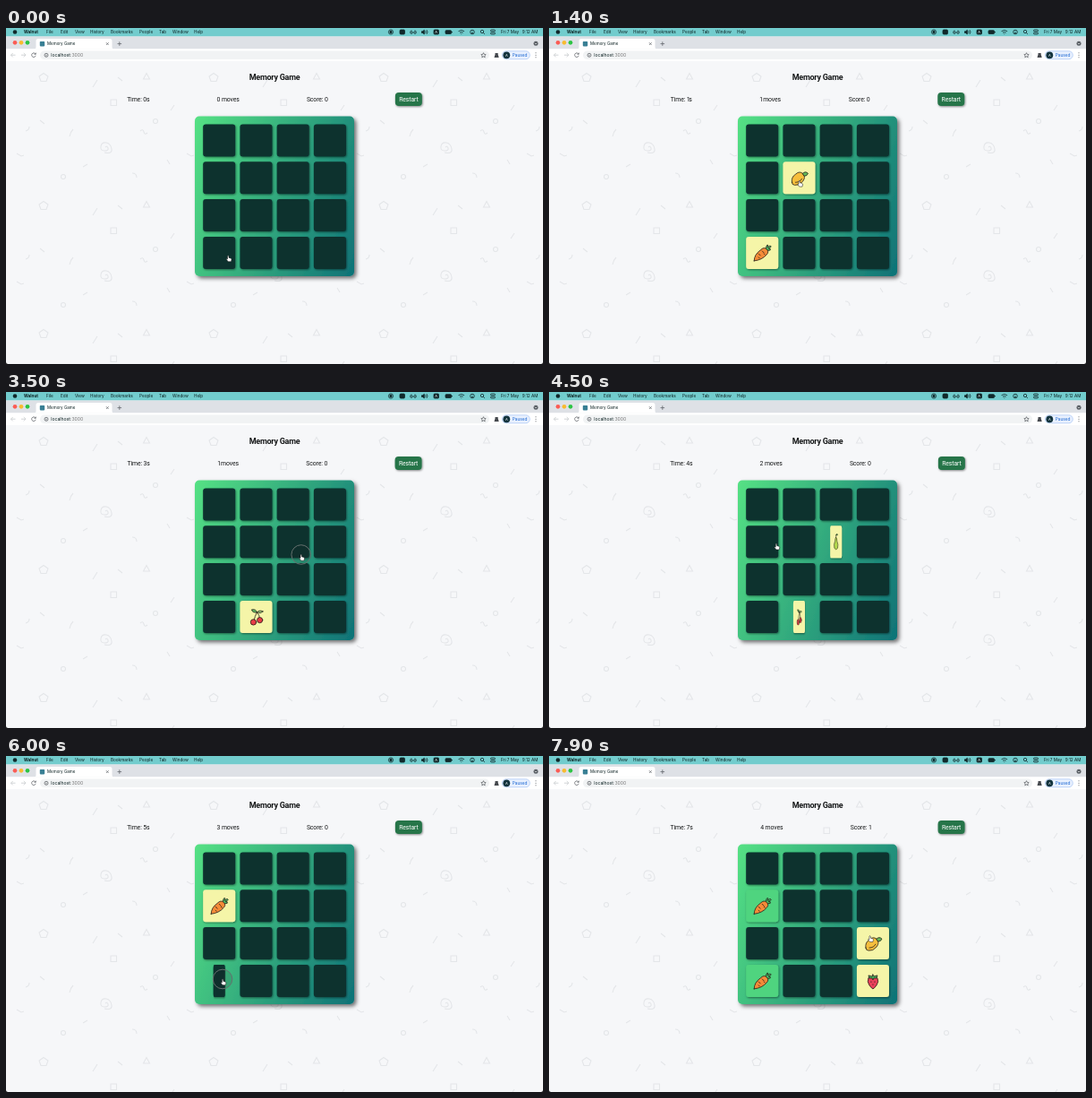
Recreate the animation shown at these times as an HTML page. Size 600 by 375 pixels, loop 8000 ms.

```html
<!DOCTYPE html>
<html lang="en">
<head>
<meta charset="utf-8">
<title>Memory Game</title>
<style>
  html, body { margin: 0; width: 100%; height: 100%; overflow: hidden; background: #f6f7f9; }
  svg { display: block; width: 100vw; height: 100vh; }
  text { font: 4.65px Inter, sans-serif; fill: #0b2021; }
  .page text { font: 6.9px Roboto, sans-serif; letter-spacing: -.12px; fill: #161819; }
  .page .title { font-size: 9px; font-weight: 700; letter-spacing: -.25px; }
  .page .label { fill: #fff; }
  .line { fill: none; stroke: #62666b; stroke-width: .8; }
  .ink { stroke: #25201b; stroke-width: .8; stroke-linejoin: round; stroke-linecap: round; }
</style>
</head>
<body>
<svg viewBox="0 0 600 375">
  <defs>
    <linearGradient id="green" x1="-.1" y1=".28" x2="1.1" y2=".72">
      <stop stop-color="#55e184"/><stop offset="1" stop-color="#0f7277"/>
    </linearGradient>
    <filter id="deep" x="-10%" y="-10%" width="125%" height="125%">
      <feDropShadow dx="2.5" dy="2.5" stdDeviation="2" flood-opacity=".55"/>
    </filter>
    <filter id="soft" x="-20%" y="-20%" width="150%" height="150%">
      <feDropShadow dx=".8" dy="1" stdDeviation=".9" flood-opacity=".45"/>
    </filter>
    <pattern id="doodles" y="37" width="190" height="143" patternUnits="userSpaceOnUse">
      <g fill="none" stroke="#e4e6e9" stroke-width="1.1">
        <path d="M111 96q2-2 3 1t-4 3-4-5 6-4 6 7-8 4"/>
        <path d="M42 13.500l5 3.500-2 5.500h-6l-2-5.500z"/>
        <path d="M117 43h6.500v6.500h-6.500z"/>
        <path d="M157 13.500l3.500 6.500h-7z"/>
        <circle cx="64" cy="129" r="2.500"/>
        <circle cx="167" cy="67" r="2.500"/>
        <path d="M71 84q1-5 4-8M97 29l5-8M184 55l4-6M12 103l5 3 3-1M150 78q3-3 4 1t4 1"/>
        <path d="M125 18l5 4M22 78q4-1 4-5M38 66l5 4M141 125q5 0 5 5M86 118l5-3M180 110l3 5"/>
      </g>
    </pattern>
  </defs>

  <rect width="600" height="9.500" fill="#72cccd"/>
  <circle cx="10" cy="4.500" r="2.300" fill="#10282a"/>
  <g id="menu"></g>
  <g fill="none" stroke="#10282a" stroke-width=".8">
    <circle cx="430" cy="4.500" r="2.600"/><circle cx="430" cy="4.500" r="1.200" fill="#10282a"/>
    <rect x="440" y="2" width="5.500" height="5" rx="1.200" fill="#10282a"/>
    <circle cx="453" cy="5" r="1.300"/><circle cx="457" cy="5" r="1.300"/><path d="M452 3.500l1-1M458 3.500l-1-1"/>
    <path d="M464.500 3.700h1.200l1.600-1.400v4.600l-1.600-1.400h-1.200z" fill="#10282a"/><path d="M468.500 3q1.500 1.500 0 3M470 2.200q2 2.300 0 4.600"/>
    <rect x="478" y="2" width="5.500" height="5" rx="1" fill="#10282a"/>
    <rect x="491" y="2.700" width="6.500" height="3.800" rx=".8" fill="#10282a"/><path d="M498.500 4v1.200"/>
    <path d="M505.500 3.700q3.300-2.600 6.600 0M507 5.200q1.800-1.300 3.600 0M508.500 6.600h.7"/>
    <circle cx="521" cy="4.500" r="2.300"/><path d="M519.800 6q1.200-1.500 2.400 0M521 3.500v.8"/>
    <circle cx="532" cy="4" r="1.700"/><path d="M533.300 5.300l1.600 1.600"/>
    <rect x="541.500" y="2" width="5" height="1.900" rx=".95"/><rect x="541.500" y="5" width="5" height="1.900" rx=".95"/>
  </g>
  <text x="479.300" y="6" style="font-size:4px;fill:#fff">A</text>

  <rect y="9.500" width="600" height="14" fill="#dee1e6"/>
  <circle cx="10" cy="16.300" r="2.350" fill="#fb5c55"/>
  <circle cx="17" cy="16.300" r="2.350" fill="#f8bb30"/>
  <circle cx="24" cy="16.300" r="2.350" fill="#2cc443"/>
  <path d="M31 23.500q2.500 0 2.500-2.500v-6.500q0-2.500 2.500-2.500h80q2.500 0 2.500 2.500v6.500q0 2.500 2.500 2.500z" fill="#fff"/>
  <rect x="37.800" y="15" width="5.400" height="5.400" rx=".8" fill="#397f94"/>
  <text x="46" y="19.300" style="font-size:4.500px">Memory Game</text>
  <path class="line" d="M112 16.300l2.600 2.600m0-2.600l-2.600 2.600M124.500 17.600h4.600m-2.300-2.300v4.600"/>
  <circle cx="592" cy="17.300" r="2.500" fill="#5a5f65"/>
  <path d="M590.800 16.800l1.200 1.200 1.200-1.200" fill="none" stroke="#fff" stroke-width=".6"/>

  <rect y="23.300" width="600" height="13.700" fill="#fff"/>
  <rect x="38" y="25.500" width="502" height="9.600" rx="4.800" fill="#f1f3f4"/>
  <g class="line">
    <path d="M10.500 30.200h-5m2.200-2.200l-2.200 2.200 2.200 2.200M17 30.200h5m-2.200-2.200l2.200 2.200-2.200 2.200" stroke="#c6c9cc"/>
    <path d="M32.800 28.800a2.300 2.300 0 1 0 .4 2M33.300 27.600v1.700h-1.700"/>
    <circle cx="45" cy="30.300" r="2"/><path d="M45 30v1.500M45 28.900v.4"/>
    <path d="M533.500 27.700l.8 1.700 1.900.2-1.400 1.300.4 1.900-1.700-1-1.700 1 .4-1.900-1.400-1.300 1.900-.2z"/>
  </g>
  <path d="M546.500 28h3.200v1.500l1 3.400h-5.200l1-3.400z" fill="#45494e"/>
  <text x="50.200" y="32" style="font-size:5.100px">localhost<tspan fill="#777">:3000</tspan></text>
  <rect x="554.300" y="25.800" width="31" height="9" rx="4.500" fill="#e8f0fe" stroke="#9bbcf1" stroke-width=".6"/>
  <circle cx="559.300" cy="30.300" r="3.900" fill="#12333d"/>
  <text x="557.900" y="31.800" style="font-size:4px;fill:#fff">A</text>
  <text x="565.700" y="32" style="font-size:4.800px;fill:#1a66d2">Paused</text>
  <path d="M592 27.700v.1m0 2.400v.1m0 2.400v.1" stroke="#50555a" stroke-width="1.100" stroke-linecap="round"/>

  <rect y="37" width="600" height="338" fill="#f6f7f9"/>
  <rect y="37" width="600" height="338" fill="url(#doodles)"/>
  <g class="page">
    <text class="title" x="300" y="58" text-anchor="middle">Memory Game</text>
    <text id="time" y="82"></text>
    <text id="moves" y="82"></text>
    <text id="score" y="82"></text>
    <g id="restart">
      <rect y="72" width="30" height="15" rx="4" fill="#267449" filter="url(#soft)"/>
      <text class="label" x="15" y="82" text-anchor="middle">Restart</text>
    </g>
  </g>
  <rect x="211" y="98.500" width="178" height="178.500" rx="5" fill="url(#green)" filter="url(#deep)"/>
  <g id="cards"></g>
  <circle id="ring" r="10.800" fill="#222" fill-opacity=".12" stroke="#66716f" stroke-width="1"/>
  <g id="pointer" stroke="#111" stroke-width=".5" stroke-linejoin="round" fill="#fff">
    <path id="hand" d="M-.6.300q.7-.9 1.200.100l.3 2 2.100.600q1 .300.800 1.500l-.5 2.200h-3.300l-2.100-2.700q.100-1 1.400 0z"/>
    <path id="arrow" d="M0 0v5l1.200-1 .9 1.900 1-.500-.9-1.800h1.500z"/>
  </g>
  <path d="M0 372.500v2.500h2.500q-2.500 0-2.500-2.500M600 372.500v2.500h-2.500q2.500 0 2.500-2.500" fill="#111"/>
</svg>
<script>
const LOOP = 8000, FLIP = 240, SIZE = 36;
const $ = id => document.getElementById(id);
const clamp = v => Math.max(0, Math.min(1, v));
const ease = v => v * v * (3 - 2 * v);

const menu = [[20, "Walnut"], [45, "File"], [61, "Edit"], [77, "View"], [94, "History"],
  [117, "Bookmarks"], [149, "People"], [171, "Tab"], [186, "Window"], [210, "Help"],
  [553, "Fri 7 May\u2002 9:12 AM"]];
$("menu").innerHTML = menu.map(([x, label], i) =>
  `<text x="${x}" y="6.2" ${i ? "" : 'font-weight="700" style="font-weight:700"'}>${label}</text>`).join("");

const shape = (d, fill) => `<path class="ink" d="${d}" fill="${fill}"/>`;
const icons = {
  carrot: shape("M4-5q1-4 2-4 1 1 0 3 3-3 4-1 0 1-3 2 3 0 2 2-2 1-5 0z", "#48b964") +
    shape("M-9 9q0-7 7-12 4-4 7-1t0 6q-5 6-14 7z", "#f58b38") +
    shape("M-4 1l2 2M0-2l2 2M-3 6l-1-1M3 2l-1-1", "none"),
  cherry: shape("M-2.500 5q1-6 3.500-10Q4-2 4 2", "none") +
    shape("M1-5q-5 1-6-3 5-1 6 3z", "#62bd62") + shape("M1-5q2-3 7-1-3 3-7 1z", "#a9dc83") +
    '<circle class="ink" cx="-3" cy="6" r="3.200" fill="#e93d46"/><circle class="ink" cx="4.200" cy="3.700" r="3.100" fill="#e93d46"/>',
  mango: shape("M-8 5q-1-6 4-9 4-4 8-1 4 4 0 9-4 5-9 4-3 0-3-3z", "#f6be3c") +
    shape("M4-5q3-3 6 0-1 3-4 3z", "#62b95a") + shape("M-4 5q5 0 7-4", "none"),
  pear: shape("M0-5q3 0 3 4 5 4 2 8-5 3-10 0-3-4 2-8 0-4 3-4z", "#b3d84d") +
    shape("M0-5v-3q4-2 5 0-2 2-5 0", "#55a94f"),
  strawberry: shape("M-5-3q-2 4 1 8 3 4 4 4t4-4q3-4 1-8-5-3-10 0z", "#e9415a") +
    shape("M0-7l1 2 4-1-1 3-3 0-1 2-1-2-3 0-1-3 4 1z", "#49ae5b") +
    shape("M-2 1v.5M2 1v.5M0 4v.5", "none")
};

// column, row, icon, time opened, time closed
const flips = [
  [0, 3, "carrot", 150, 9e3], [1, 1, "mango", 1100, 1840],
  [1, 3, "cherry", 2450, 4400], [2, 1, "pear", 3520, 4400],
  [0, 1, "carrot", 4900, 9e3], [0, 3, "carrot", 5900, 9e3],
  [3, 3, "strawberry", 7150, 9e3], [3, 2, "mango", 7600, 9e3]
];
flips[0][4] = flips[1][4];
const MATCH = 6150;
const clicks = flips.map(f => f[3]);

// time, x, y
const path = [
  [0, 248.2, 254], [300, 248.2, 254], [800, 277.2, 218], [1050, 279, 166], [1300, 279, 166],
  [2000, 291.500, 244], [2100, 292.2, 245], [2800, 292.2, 245], [3400, 329.700, 181.500],
  [3750, 329.700, 181.500], [4750, 240, 167], [5050, 241, 169], [5400, 282.2, 220],
  [5800, 242, 249], [6200, 242, 249], [6900, 354.800, 230.800], [7080, 362, 249],
  [7250, 362, 249], [7530, 359, 203], [8000, 358.500, 200.500]
];
function cursorAt(t) {
  const i = path.findIndex(p => p[0] > t), [t0, x0, y0] = path[i - 1], [t1, x1, y1] = path[i];
  const k = ease((t - t0) / (t1 - t0));
  return [x0 + (x1 - x0) * k, y0 + (y1 - y0) * k];
}

const cards = [];
for (let row = 0; row < 4; row++) for (let col = 0; col < 4; col++) {
  const uses = flips.filter(f => f[0] === col && f[1] === row);
  const el = document.createElementNS("http://www.w3.org/2000/svg", "g");
  el.innerHTML = `<rect x="-18" y="-18" width="${SIZE}" height="${SIZE}" rx="3" filter="url(#soft)"/>
    <g>${uses.length ? icons[uses[0][2]] : ""}</g>`;
  $("cards").append(el);
  cards.push({ el, uses, x: 238.2 + col * 41.25, y: 125.5 + row * 41.800 });
}

function drawCard({ el, uses, x, y }, t) {
  const open = Math.max(0, ...uses.map(([, , , a, b]) =>
    ease(clamp((t - a) / FLIP)) - ease(clamp((t - b) / FLIP))));
  const face = open > .5, matched = t >= MATCH && uses.some(f => f[2] === "carrot");
  const [rect, icon] = el.children;
  el.setAttribute("transform", `translate(${x} ${y}) scale(${Math.abs(Math.cos(open * Math.PI)) + .001} 1)`);
  rect.setAttribute("fill", !face ? "#0a302f" : matched ? "#50d47f" : "#f5f5a8");
  icon.setAttribute("visibility", face ? "visible" : "hidden");
}

function drawStats(t) {
  const values = {
    time: `Time: ${Math.max(0, Math.floor((t - 245) / 1030))}s`,
    moves: `${[1, 3, 5, 7].filter(i => t >= clicks[i]).length} moves`,
    score: `Score: ${+(t >= MATCH)}`
  };
  const widths = Object.entries(values).map(([id, value]) => {
    $(id).innerHTML = value.replace("1", '<tspan letter-spacing="-1.6" style="letter-spacing:-1.6px">1</tspan>');
    return $(id).getComputedTextLength();
  });
  const gap = (480 - 30 - widths.reduce((a, b) => a + b)) / 5;
  let x = 60 + gap;
  Object.keys(values).forEach((id, i) => {
    $(id).setAttribute("x", x);
    x += widths[i] + gap;
  });
  $("restart").setAttribute("transform", `translate(${x} 0)`);
}

function drawPointer(t) {
  const [x, y] = cursorAt(t);
  const over = cards.some(c => Math.abs(x - c.x) < SIZE / 2 && Math.abs(y - c.y) < SIZE / 2);
  const place = `translate(${x} ${y})`;
  $("pointer").setAttribute("transform", place);
  $("hand").setAttribute("visibility", over ? "visible" : "hidden");
  $("arrow").setAttribute("visibility", over ? "hidden" : "visible");
  $("ring").setAttribute("transform", place);
  $("ring").setAttribute("visibility", clicks.some(c => t > c - 110 && t < c + 180) ? "visible" : "hidden");
}

const start = performance.now();
function draw() {
  const t = (performance.now() - start) % LOOP;
  cards.forEach(c => drawCard(c, t));
  drawStats(t);
  drawPointer(t);
  requestAnimationFrame(draw);
}
draw();
</script>
</body>
</html>
```
